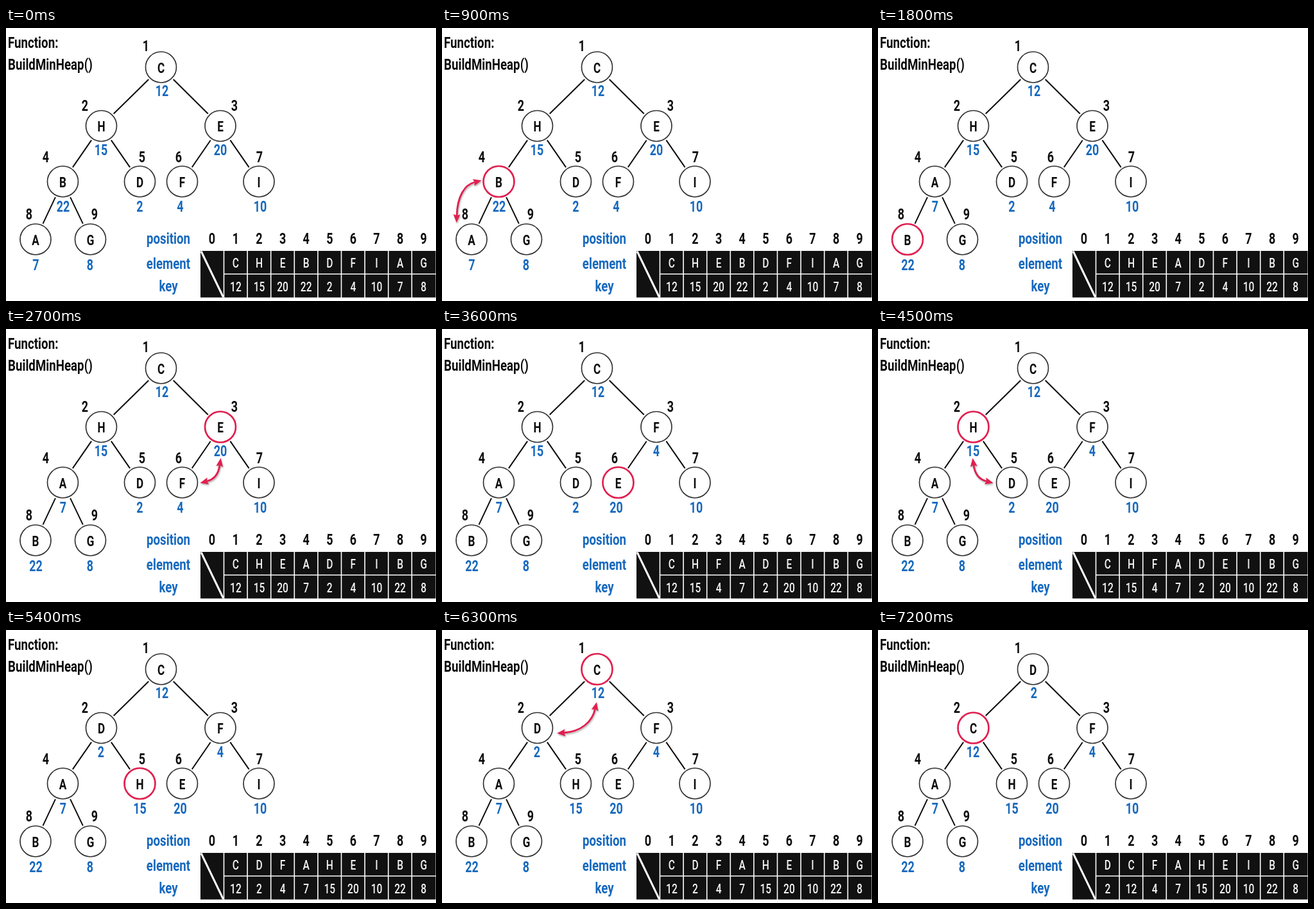
Animation of 670 by 425 pixels, one loop 8000 ms. Source, as an HTML page:

```html
<!DOCTYPE html>
<html lang="en">
<head>
<meta charset="utf-8">
<title>Build min heap</title>
<style>
  html, body { margin: 0; width: 100%; height: 100%; overflow: hidden; background: #fff; }
  svg { display: block; width: 670px; height: 425px; }
  text { font: 700 23px Roboto, "Open Sans", "Noto Sans", sans-serif; font-stretch: 78%; text-anchor: middle; fill: #0c0c0c; }
  .title { font-size: 24px; text-anchor: start; }
  .blue { fill: #1769be; }
  .head { font-size: 24px; }
  .cell { font-size: 20px; font-weight: 500; fill: #f4f4f4; }
  .letter { font-size: 22px; }
  .edge { stroke: #0c0c0c; stroke-width: 2; }
  .node { fill: #fff; stroke: #333; stroke-width: 1.7; }
  .node.active { stroke: #e0204f; stroke-width: 2.7; }
  .rule { stroke: #fff; stroke-width: 1.6; }
  .arrow { fill: none; stroke: #e0204f; stroke-width: 2.8; marker-start: url(#tip); marker-end: url(#tip);
           filter: drop-shadow(1px 2px 1px rgba(0, 0, 0, .3)); }
</style>
</head>
<body>
<svg id="stage" viewBox="0 0 670 425">
  <defs>
    <marker id="tip" markerUnits="userSpaceOnUse" markerWidth="13" markerHeight="12" refX="2" refY="6" orient="auto-start-reverse">
      <path d="M0 .5L13 6L0 11.5L2 6Z" fill="#e0204f"/>
    </marker>
  </defs>
</svg>
<script>
const stage = document.getElementById('stage');
const STEP = 900, LOOP = 8000;
const START = [['C', 12], ['H', 15], ['E', 20], ['B', 22], ['D', 2], ['F', 4], ['I', 10], ['A', 7], ['G', 8]];

// node x, y, index label x, y, key x, y
const NODES = [
  [241.5, 61, 218, 28, 243, 98],
  [148.5, 152.5, 123, 121, 148, 190],
  [334, 152.5, 356, 121, 334, 190],
  [88.5, 239, 62, 201, 89, 278],
  [208.5, 239, 212, 201, 208.5, 278],
  [274.5, 239, 269, 201, 271.5, 278],
  [394, 239, 395, 201, 396, 278],
  [46, 329, 36, 290, 46.5, 369],
  [131.5, 329, 138, 290, 131, 369]
];

// parent, child, arrow between them
const SWAPS = [
  [3, 7, 'M51 240C35 244 24 262 23 292'],
  [2, 5, 'M333 212C331 226 325 234 313 237'],
  [1, 4, 'M149 212C151 226 157 234 169 237'],
  [0, 1, 'M238.5 123C234 143 217 158 190 160']
];

function add(tag, attrs) {
  const el = document.createElementNS('http://www.w3.org/2000/svg', tag);
  for (const name in attrs) el.setAttribute(name, attrs[name]);
  return stage.appendChild(el);
}

function line(cls, x1, y1, x2, y2) {
  return add('line', { class: cls, x1, y1, x2, y2 });
}

// Synthetic condensed face where the font has no narrow cut
function probe(stretch) {
  const el = add('text', { style: 'font-stretch:' + stretch });
  el.textContent = 'BuildMinHeap()';
  const width = el.getComputedTextLength();
  el.remove();
  return width;
}
const squeeze = probe('78%') > probe('100%') * 0.95 ? 0.78 : 1;

function label(cls, x, y, text = '') {
  const el = add('text', { class: cls, transform: `translate(${x} ${y}) scale(${squeeze} 1)` });
  el.textContent = text;
  return el;
}

label('title', 3, 30.5, 'Function:');
label('title', 3, 64.5, 'BuildMinHeap()');

NODES.forEach(([x, y], i) => {
  if (!i) return;
  const [px, py] = NODES[(i - 1) >> 1];
  const len = Math.hypot(x - px, y - py);
  const ux = (x - px) / len, uy = (y - py) / len;
  line('edge', px + ux * 27, py + uy * 27, x - ux * 27, y - uy * 27);
});

const tree = NODES.map(([x, y, ix, iy, kx, ky], i) => {
  const ring = add('circle', { class: 'node', cx: x, cy: y, r: 24 });
  label('', ix, iy + 8.2, i + 1);
  return { ring, letter: label('letter', x, y + 8.8), key: label('blue', kx, ky + 8.2) };
});

['position', 'element', 'key'].forEach((word, i) => {
  label('blue head', 253, [336, 375, 410][i], word);
});
add('rect', { x: 303, y: 347, width: 366.5, height: 72.5, fill: '#111' });
line('rule', 339.5, 383, 670, 383);
add('line', { x1: 304, y1: 347.5, x2: 338.5, y2: 419, stroke: '#fff', 'stroke-width': 3 });
label('', 321, 336, 0);

const table = NODES.map((_, i) => {
  const left = 339.5 + i * 36.6, x = left + 18.4;
  line('rule', left, 347, left, 420);
  label('', x, 336, i + 1);
  return { letter: label('cell', x, 373), key: label('cell', x, 410.2) };
});

const arrow = add('path', { class: 'arrow' });

function show(step) {
  const items = START.slice();
  const done = step >> 1;
  for (const [a, b] of SWAPS.slice(0, done)) [items[a], items[b]] = [items[b], items[a]];

  const pending = step % 2 === 1;
  const active = pending ? SWAPS[done][0] : done ? SWAPS[done - 1][1] : -1;
  items.forEach(([letter, key], i) => {
    for (const slot of [tree[i], table[i]]) {
      slot.letter.textContent = letter;
      slot.key.textContent = key;
    }
    tree[i].ring.classList.toggle('active', i === active);
  });
  arrow.style.display = pending ? '' : 'none';
  if (pending) arrow.setAttribute('d', SWAPS[done][2]);
}

let shown = -1;
const begin = performance.now();
function tick() {
  const step = Math.floor((performance.now() - begin) % LOOP / STEP);
  if (step !== shown) show(shown = step);
  requestAnimationFrame(tick);
}
tick();
</script>
</body>
</html>
```
